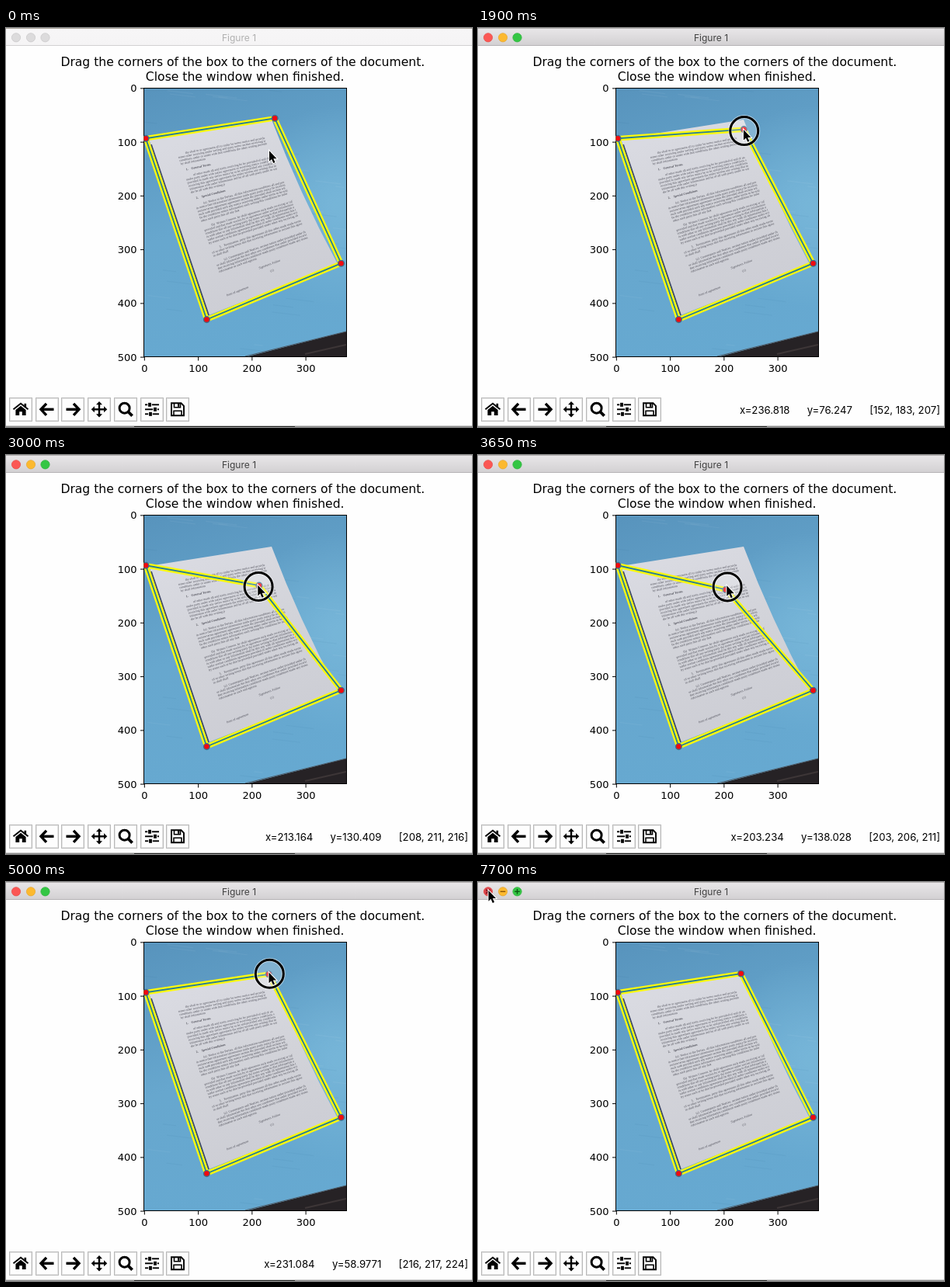
Animation, 600 px wide and 514 px high, one loop 8050 ms. Source, as an HTML page with a canvas:

```html
<!DOCTYPE html>
<html lang="en">
<head>
<meta charset="utf-8">
<title>Figure 1</title>
<style>
html, body { margin: 0; width: 100%; height: 100%; overflow: hidden; background: #fff; }
canvas { display: block; }
</style>
</head>
<body>
<canvas id="stage" width="600" height="514"></canvas>
<script>
const W = 600, H = 514, LOOP = 8050, STEP = 50, LAG = 50;
const PRESS = 900, RELEASE = 5400;
const AX = { x: 178, y: 77.5, w: 260, h: 346, k: 0.6925 };
const ctx = document.getElementById('stage').getContext('2d');

// time, then pointer position in image units
const track = [
  [0, 232, 118.5], [100, 232, 118.5], [700, 242.3, 55.5], [950, 242.3, 55.5],
  [1450, 241.113, 59.5649], [1750, 238.5, 69], [2400, 230.29, 105.561],
  [2650, 227, 116], [3400, 200.5, 140], [3650, 203.234, 138.028],
  [3700, 205, 133], [4250, 222.5, 82], [4400, 224.879, 74.4459],
  [5150, 231.5, 58], [5850, 231.5, 58], [6000, 195.117, 43.3312],
  [6050, 178, 32], [6650, -107, -71], [7200, -238, -94]
];

// time, then colour under the pointer
const tints = [
  [1450, 100, 156, 196], [2400, 212, 215, 220], [3650, 203, 206, 211],
  [4400, 216, 216, 224], [5850, 216, 218, 224], [6000, 93, 151, 193], [6400, 84, 146, 190]
];

const clamp = (v, a, b) => Math.min(b, Math.max(a, v));
// image pixels are centred on whole units
const toPx = ([x, y]) => [AX.x + (x + 0.5) * AX.k, AX.y + (y + 0.5) * AX.k];

// monotone cubic through the keys, column by column
function sample(keys, t) {
  const n = keys.length;
  t = clamp(t, keys[0][0], keys[n - 1][0]);
  let i = 0;
  while (i < n - 2 && t >= keys[i + 1][0]) i++;
  const a = keys[i], b = keys[i + 1], h = b[0] - a[0], s = (t - a[0]) / h;
  const rate = (j, c) => (keys[j + 1][c] - keys[j][c]) / (keys[j + 1][0] - keys[j][0]);
  const slope = (j, c) => {
    if (j === 0 || j === n - 1) return 0;
    const p = rate(j - 1, c), q = rate(j, c);
    return p * q <= 0 ? 0 : 2 * p * q / (p + q);
  };
  return a.slice(1).map((v, k) => {
    const c = k + 1, d = b[c] - v;
    const m0 = slope(i, c) * h, m1 = slope(i + 1, c) * h;
    return v + s * (m0 + s * (3 * d - 2 * m0 - m1 + s * (m0 + m1 - 2 * d)));
  });
}

function trace(g, pts, close) {
  g.beginPath();
  pts.forEach((p, i) => i ? g.lineTo(p[0], p[1]) : g.moveTo(p[0], p[1]));
  if (close) g.closePath();
}
function shape(g, pts, fill) {
  trace(g, pts, true);
  g.fillStyle = fill;
  g.fill();
}
function line(g, pts, color, width, close) {
  trace(g, pts, close);
  g.strokeStyle = color;
  g.lineWidth = width;
  g.stroke();
}
function disc(g, x, y, r, fill, edge, width) {
  g.beginPath();
  g.arc(x, y, r, 0, Math.PI * 2);
  if (fill) { g.fillStyle = fill; g.fill(); }
  if (edge) { g.strokeStyle = edge; g.lineWidth = width; g.stroke(); }
}
function rect(g, x, y, w, h, fill) {
  g.fillStyle = fill;
  g.fillRect(x, y, w, h);
}
function label(g, text, x, y, font, color, align) {
  g.font = font;
  g.fillStyle = color;
  g.textAlign = align || 'left';
  g.fillText(text, x, y);
}

function seeded(seed) {
  return () => (seed = (seed * 16807) % 2147483647) / 2147483647;
}

// ---- photo of the page on the table ----
const page = [[184, 143], [342, 118], [427, 304], [261, 370]];
function onPage(u, v) {
  const mix = c => {
    const l = page[0][c] + (page[3][c] - page[0][c]) * v;
    const r = page[1][c] + (page[2][c] - page[1][c]) * v;
    return l + (r - l) * u;
  };
  return [mix(0), mix(1)];
}

const words = ('the agreement of party shall and to any notice in writing with terms under this ' +
  'section provided that all other conditions by such receiving information or be made').split(' ');

function print(g, u, v, text, style) {
  const a = onPage(u, v), b = onPage(0.89, v);
  g.save();
  g.translate(a[0], a[1]);
  g.rotate(Math.atan2(b[1] - a[1], b[0] - a[0]));
  label(g, text, 0, 0, style + ' 4px "Liberation Serif", serif', 'rgba(52,52,62,.85)');
  g.restore();
}

// prints words after the given start until the line is full
function fillWords(g, u0, u1, v, rnd, text = '') {
  const a = onPage(u0, v), b = onPage(u1, v);
  const room = Math.hypot(b[0] - a[0], b[1] - a[1]);
  g.font = '4px "Liberation Serif", serif';
  while (g.measureText(text).width < room) text += words[Math.floor(rnd() * words.length)] + ' ';
  while (g.measureText(text).width > room) text = text.slice(0, -1);
  print(g, u0, v, text, '');
}

function drawPhoto() {
  const c = document.createElement('canvas');
  c.width = W;
  c.height = H;
  const g = c.getContext('2d'), rnd = seeded(77);
  const right = AX.x + AX.w;
  g.beginPath();
  g.rect(AX.x, AX.y, AX.w, AX.h);
  g.clip();

  const blue = g.createLinearGradient(220, 70, 330, 430);
  blue.addColorStop(0, 'rgb(88,148,189)');
  blue.addColorStop(0.5, 'rgb(103,167,206)');
  blue.addColorStop(1, 'rgb(102,169,209)');
  rect(g, AX.x, AX.y, AX.w, AX.h, blue);
  const glow = g.createRadialGradient(430, 230, 10, 430, 230, 130);
  glow.addColorStop(0, 'rgba(128,190,222,.6)');
  glow.addColorStop(1, 'rgba(128,190,222,0)');
  rect(g, AX.x, AX.y, AX.w, AX.h, glow);
  for (let i = 0; i < 40; i++) {
    const x = AX.x + rnd() * 250, y = AX.y + rnd() * 340, w = 10 + rnd() * 35;
    line(g, [[x, y], [x + w, y + w * 0.12]], i % 2 ? 'rgba(255,255,255,.05)' : 'rgba(30,80,120,.05)', 1.2);
  }

  // dark object in the lower corner
  shape(g, [[308, 424], [right, 391], [right, 424]], '#262225');
  line(g, [[308, 423], [right, 391]], '#4d5a66', 1.2);
  line(g, [[385, 420], [right, 408]], '#3d3637', 2);

  const paper = g.createLinearGradient(265, 130, 345, 340);
  paper.addColorStop(0, 'rgb(217,218,225)');
  paper.addColorStop(0.5, 'rgb(210,211,217)');
  paper.addColorStop(1, 'rgb(205,206,213)');
  trace(g, page.slice(0, 2));
  g.quadraticCurveTo(377, 211, ...page[2]);
  g.lineTo(...page[3]);
  g.fillStyle = paper;
  g.fill();
  line(g, [[187, 150], [225, 263], [261, 370]], 'rgba(40,52,80,.85)', 1.8);

  const rows = 'iffs.h.iffffs.h.bffffs.bfffff.bfs.bffs';
  const heads = ['1.    General Terms', '2.    Special Conditions'];
  const starts = ['(a)  Notice to the Parties. ', '(b)  Written Consent. ', '3.   Termination. ', '(c)  Counterparts and Notices. '];
  [...rows].forEach((kind, i) => {
    const v = 0.115 + i * 0.0186, l = 0.175, r = 0.885;
    if (kind === 'i') fillWords(g, 0.24, r, v, rnd);
    if (kind === 'f') fillWords(g, l, r, v, rnd);
    if (kind === 's') fillWords(g, l, 0.25 + rnd() * 0.3, v, rnd);
    if (kind === 'h') print(g, 0.2, v, heads.shift(), 'bold');
    if (kind === 'b') fillWords(g, 0.24, r, v, rnd, starts.shift());
  });
  print(g, 0.46, 0.86, 'Signatures Follow', 'italic');
  print(g, 0.53, 0.9, '(1)', '');
  print(g, 0.17, 0.94, 'form of agreement', '');
  return c;
}

// ---- window parts ----
function titleBar(active, hover, pressed) {
  const bar = ctx.createLinearGradient(0, 0, 0, 22);
  bar.addColorStop(0, active ? '#e9e7e9' : '#f7f6f7');
  bar.addColorStop(1, active ? '#d3d1d3' : '#f5f4f5');
  rect(ctx, 0, 0, W, 22, bar);
  rect(ctx, 0, 0, W, 1, active ? '#b3b0b0' : '#a9a39a');
  rect(ctx, 0, 22, W, 1, active ? '#b5b3b5' : '#d2d1d2');
  label(ctx, 'Figure 1', 300, 17, '12px Inter, sans-serif', active ? '#404040' : '#b0b0b0', 'center');

  const fills = active ? [pressed ? '#d8434a' : '#fb5754', '#fcb92f', '#34c644'] : ['#dcdbdc', '#dcdbdc', '#dcdbdc'];
  const edges = active ? ['#e9504b', '#e6a935', '#2db33c'] : ['#cbcacb', '#cbcacb', '#cbcacb'];
  [13, 32, 50.5].forEach((x, i) => {
    disc(ctx, x, 12.3, 5.6, fills[i], edges[i], 0.8);
    if (!hover) return;
    const ink = ['#6d0b0f', '#8a5406', '#0b5a12'][i];
    if (i === 0) {
      line(ctx, [[x - 2.5, 9.8], [x + 2.5, 14.8]], ink, 1.3);
      line(ctx, [[x + 2.5, 9.8], [x - 2.5, 14.8]], ink, 1.3);
    } else line(ctx, [[x - 3.3, 12.3], [x + 3.3, 12.3]], ink, 1.4);
    if (i === 2) line(ctx, [[x, 9], [x, 15.6]], ink, 1.4);
  });
}

function arrow(dir) {
  line(ctx, [[dir, -7.5], [8 * dir, 0], [dir, 7.5]], '#000', 3.4);
  line(ctx, [[-8.5 * dir, 0], [6 * dir, 0]], '#000', 3.4);
}

const icons = [
  () => {
    line(ctx, [[-9.5, 0], [0, -7.6], [9.5, 0]], '#000', 2);
    rect(ctx, 4.5, -7.5, 2.6, 5, '#000');
    shape(ctx, [[-6.6, 0.8], [0, -4.6], [6.6, 0.8], [6.6, 7.8], [1.8, 7.8], [1.8, 3], [-1.8, 3], [-1.8, 7.8], [-6.6, 7.8]], '#000');
  },
  () => arrow(-1),
  () => arrow(1),
  () => {
    for (let i = 0; i < 4; i++) {
      ctx.rotate(Math.PI / 2);
      line(ctx, [[0, 0], [7, 0]], '#000', 2.4);
      shape(ctx, [[10.3, 0], [6, -4], [6, 4]], '#000');
    }
  },
  () => {
    disc(ctx, -1.4, -1.6, 6.5, null, '#000', 3);
    line(ctx, [[3.4, 3.2], [8.6, 8.4]], '#000', 3.8);
  },
  () => {
    [[-6, -3], [0, 4], [6, -2]].forEach(([y, x]) => {
      line(ctx, [[-9, y], [9, y]], '#000', 1.9);
      rect(ctx, x - 2.8, y - 2.9, 5.6, 5.8, '#fdfdfd');
      rect(ctx, x - 1.9, y - 2.5, 3.8, 5, '#000');
    });
  },
  () => {
    line(ctx, [[-8, -8], [4.5, -8], [8, -4.5], [8, 8], [-8, 8]], '#000', 1.9, true);
    line(ctx, [[-4.5, -8], [-4.5, -2.5], [3.5, -2.5], [3.5, -8]], '#000', 1.6);
    rect(ctx, 0, -7.5, 2.2, 4, '#000');
    line(ctx, [[-5, 8], [-5, 2], [5, 2], [5, 8]], '#000', 1.6);
  }
];

function toolbar() {
  icons.forEach((icon, i) => {
    const x = Math.round(4 + i * 33.7);
    rect(ctx, x, 476, 30, 31, '#b9b9b9');
    rect(ctx, x + 1, 477, 28, 29, '#e6e6e6');
    rect(ctx, x + 2, 478, 26, 27, '#fdfdfd');
    ctx.save();
    ctx.translate(x + 15, 491.3);
    icon();
    ctx.restore();
  });
}

function axes() {
  const big = '15.6px "DejaVu Sans", sans-serif', small = '13px "DejaVu Sans", sans-serif';
  label(ctx, 'Drag the corners of the box to the corners of the document.', 304.8, 49, big, '#000', 'center');
  label(ctx, 'Close the window when finished.', 307.7, 68.3, big, '#000', 'center');
  for (let n = 0; n <= 500; n += 100) {
    const [x, y] = toPx([n, n]);
    line(ctx, [[AX.x - 5, y], [AX.x, y]], '#000', 1);
    label(ctx, n, 168.5, y + 4.5, small, '#000', 'right');
    if (n > 300) continue;
    line(ctx, [[x, AX.y + AX.h], [x, AX.y + AX.h + 5]], '#000', 1);
    label(ctx, n, x, 443, small, '#000', 'center');
  }
}

function box(corner) {
  const pts = [[180, 142.3], corner, [431.5, 303.2], [258.4, 375.6]];
  ctx.save();
  ctx.beginPath();
  ctx.rect(AX.x - 0.5, AX.y, AX.w + 1, AX.h);
  ctx.clip();
  line(ctx, pts, '#fbf80e', 6.6, true);
  line(ctx, pts, '#2b8093', 1.9, true);
  pts.forEach(p => disc(ctx, p[0], p[1], 3.9, '#f00a0f', '#3a6f92', 1.3));
  ctx.restore();
}

function pointer(x, y, down) {
  if (down) {
    disc(ctx, x + 0.8, y, 18, 'rgba(255,255,255,.22)', 'rgba(255,255,255,.5)', 5);
    disc(ctx, x + 0.8, y, 18, null, '#000', 3);
  }
  ctx.save();
  ctx.translate(x, y - 1.7);
  const pts = [[0, 0], [0, 13.6], [3, 10.8], [5.3, 15.9], [7.5, 14.9], [5.3, 10], [9.5, 10]];
  line(ctx, pts, '#fff', 2, true);
  shape(ctx, pts, '#000');
  ctx.restore();
}

function status(pos, t) {
  const [x, y] = pos;
  if (t < 1000 || x < 0 || y < 0) return;
  const num = v => Number(v.toPrecision(6));
  const rgb = sample(tints, t).map(Math.round).join(', ');
  const gap = ' '.repeat(6);
  label(ctx, `x=${num(x)}${gap}y=${num(y)}${gap}[${rgb}]`, 595, 497.3, '13.2px Inter, sans-serif', '#000', 'right');
}

const photo = drawPhoto();

function draw(t) {
  const [px, py] = toPx(sample(track, t + LAG));
  rect(ctx, 0, 0, W, H, '#fefefe');
  titleBar(t >= PRESS + 50, px < 60 && py < 21, t >= 7300);
  axes();
  ctx.drawImage(photo, 0, 0);
  ctx.strokeStyle = '#000';
  ctx.lineWidth = 1;
  ctx.strokeRect(AX.x - 0.5, AX.y, AX.w + 1, AX.h);
  box(toPx(sample(track, clamp(t, PRESS, RELEASE))));
  toolbar();
  status(sample(track, t), t);
  rect(ctx, 0, 512, W, 1, '#c9c9c9');
  rect(ctx, 0, 513, W, 1, '#8f8f90');
  rect(ctx, 165, 513, 207, 1, '#232523');
  pointer(px, py, t >= PRESS && t < RELEASE);
}

const begin = performance.now();
function tick() {
  const t = (performance.now() - begin) % LOOP;
  draw(Math.floor(t / STEP) * STEP);
  requestAnimationFrame(tick);
}
tick();
</script>
</body>
</html>
```
